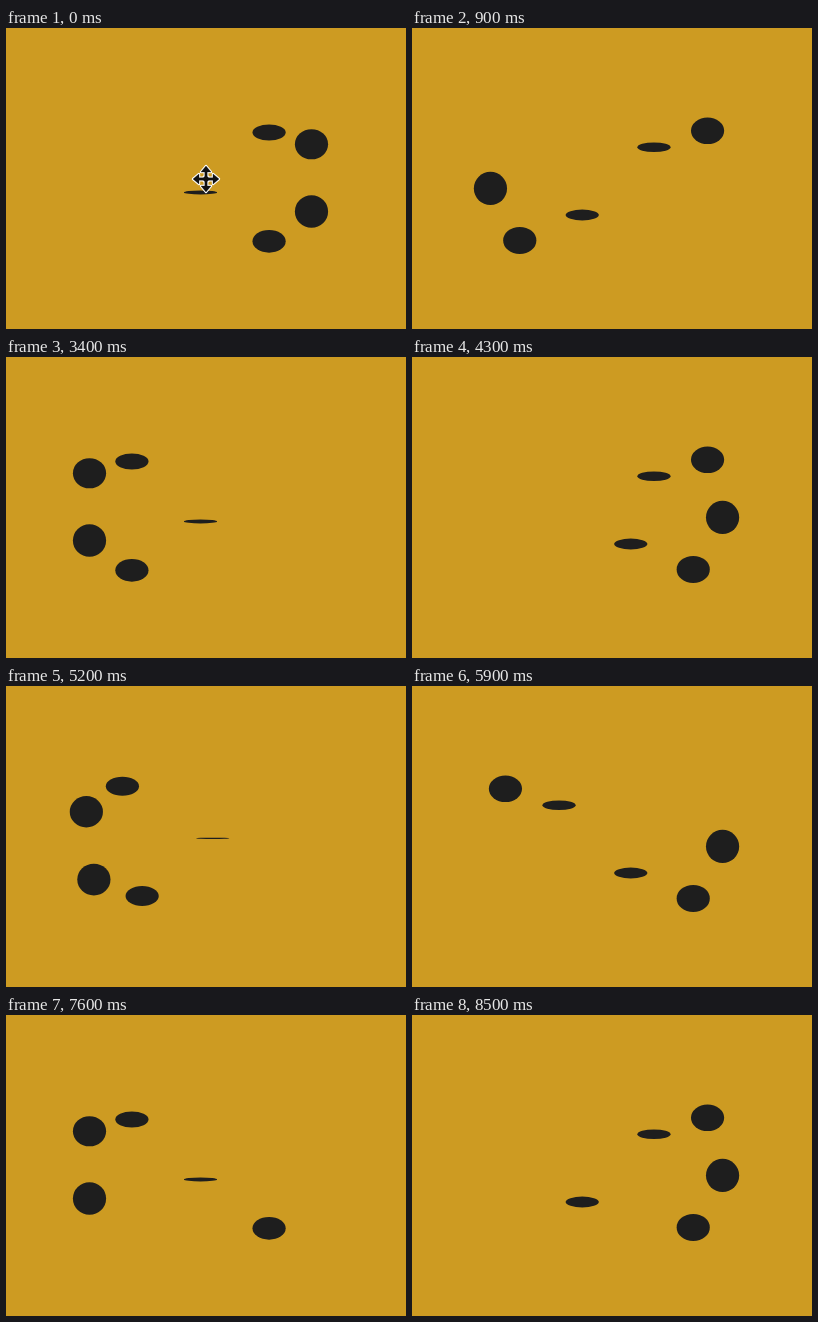
These frames come from a looping animation (400x301 px, 8600 ms). An HTML page:

```html
<!DOCTYPE html>
<html lang="en">
<head>
<meta charset="utf-8">
<title>Discs on a figure eight</title>
<style>
  html, body { margin: 0; width: 100%; height: 100%; overflow: hidden; background: #cd9b22; }
  svg { display: block; width: 100vw; height: 100vh; }
</style>
</head>
<body>
<svg viewBox="0 0 400 301" preserveAspectRatio="none">
  <g id="discs" fill="#1e1e1e"></g>
  <g id="cursor" transform="translate(200 151)" stroke-linejoin="round"></g>
</svg>
<script>
const NS = 'http://www.w3.org/2000/svg';
const STEP_MS = 100, STEPS = 86;
const DISCS = 5, SPACING = 36, RADIUS = 16.6;
const CENTER = { x: 194.5, y: 156.4 };
const REACH = { x: 116.7, y: 57.8 };

const sinDeg = a => Math.sin(a * Math.PI / 180);

function add(parent, name, attrs = {}) {
  const el = document.createElementNS(NS, name);
  for (const key in attrs) el.setAttribute(key, attrs[key]);
  return parent.appendChild(el);
}

const discs = Array.from({ length: DISCS }, () =>
  add(document.getElementById('discs'), 'ellipse', { rx: RADIUS }));

// Four-way move pointer: one arm turned in quarter steps, white rim below the black.
const cursor = document.getElementById('cursor');
for (const rim of [true, false]) {
  const color = rim ? '#fff' : '#111';
  for (let turn = 0; turn < 360; turn += 90) {
    add(cursor, 'path', {
      d: 'M-1.2 0V-7H-5L0 -13L5 -7H1.2V0Z',
      transform: `rotate(${turn})`,
      fill: color, stroke: color, 'stroke-width': rim ? 2.4 : 0.3
    });
  }
  add(cursor, 'circle', { r: rim ? 4 : 2.7, fill: color });
}

// Angle of the last disc: a slow start, then a steady 18 degrees per step
// with the slight unevenness of a motion made of 6 degree ticks.
function tailAngle(step) {
  if (step < 9) return 6 * Math.round(step * 20 / 9);
  const early = step % 2 === 0 && (step < 46 || step > 54);
  return 18 * step - 42 + (early ? 6 : 0);
}

function draw(time) {
  const step = Math.floor(time / STEP_MS) % STEPS;
  const tail = tailAngle(step);
  discs.forEach((disc, i) => {
    const angle = tail + i * SPACING;
    disc.setAttribute('cx', CENTER.x + REACH.x * sinDeg(angle));
    disc.setAttribute('cy', CENTER.y + REACH.y * sinDeg(2 * angle + 8));
    disc.setAttribute('ry', Math.max(0.7, RADIUS * Math.abs(sinDeg(angle + 7))));
  });
  cursor.setAttribute('visibility', step === 0 ? 'visible' : 'hidden');
}

const start = performance.now();
function tick() {
  draw(performance.now() - start);
  requestAnimationFrame(tick);
}
tick();
</script>
</body>
</html>
```
